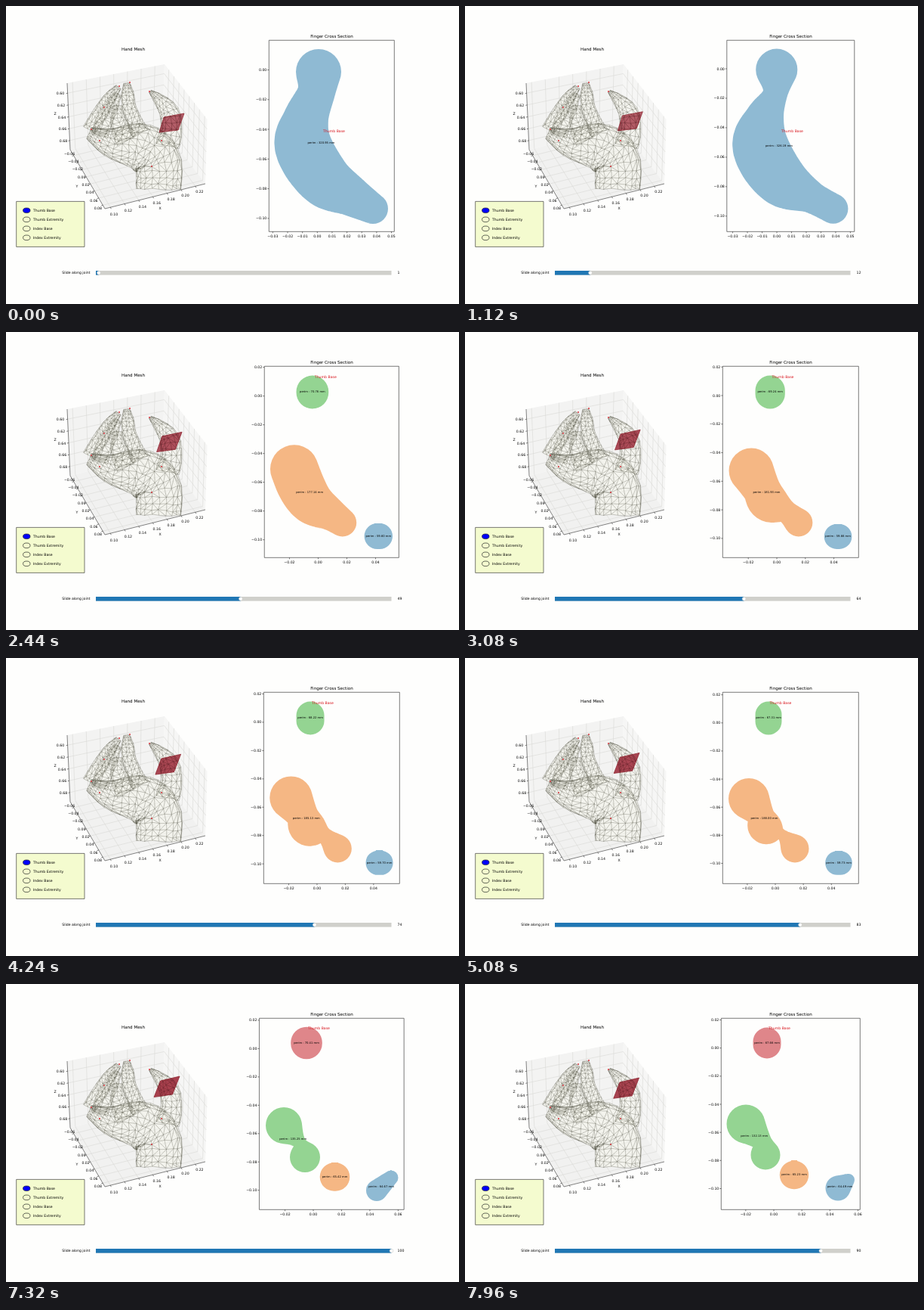
These frames come from a looping animation (600 px wide and 394 px high, 8 s). An HTML page with a canvas:

```html
<!DOCTYPE html>
<html lang="en">
<head>
<meta charset="utf-8">
<title>Hand Mesh</title>
<style>
html, body { margin: 0; width: 600px; height: 394px; overflow: hidden; background: #fefefd; }
canvas { display: block; }
</style>
</head>
<body>
<canvas id="stage" width="600" height="394"></canvas>
<script>
const c = document.getElementById('stage').getContext('2d');
const BLUE = '#8fbad3', ORANGE = '#f5b784', GREEN = '#94d492', RED = '#df868a';

const mix = (a, b, u) => a.map((n, i) => n + (b[i] - n) * u);
const fixed = n => (n < -0.001 ? '\u2212' : '') + Math.abs(n).toFixed(2);

// Rows are [position, ...numbers], mixed linearly and clamped at the ends.
function at(rows, p) {
  const i = rows.findIndex(r => r[0] >= p);
  if (i < 1) return rows[i ? rows.length - 1 : 0];
  const a = rows[i - 1], b = rows[i];
  return mix(a, b, (p - a[0]) / (b[0] - a[0]));
}

// A body is a flat list of discs x, y, r; spine() is a smooth curve through them.
function spine(body, u) {
  const last = body.length / 3 - 1, i = Math.min(Math.floor(u * last), last - 1), t = u * last - i;
  const disc = k => body.slice(3 * Math.max(0, Math.min(last, k)), 3 * Math.max(0, Math.min(last, k)) + 3);
  const [a, b, d, e] = [disc(i - 1), disc(i), disc(i + 1), disc(i + 2)];
  return b.map((n, k) => n + t / 2 * (d[k] - a[k] + t * (2 * a[k] - 5 * n + 4 * d[k] - e[k]
    + t * (3 * (n - d[k]) + e[k] - a[k]))));
}

// Time and slider value
const slide = [[40, 1], [840, 6], [1120, 12], [1800, 32], [2520, 51], [3080, 64], [3560, 74],
  [4500, 74], [5080, 83], [5240, 83], [5840, 100], [7500, 100], [7940, 90]];

// Slider value, plot width, x and y of zero, pixels per unit
const frame = [[1, 166, 412.3, 84.5, 1964], [12, 169, 413, 83, 1948], [32, 176, 414, 85.4, 1913],
  [64, 180, 413, 84, 1889], [83, 180, 411, 85.8, 1857], [90, 184, 409, 84.7, 1858], [100, 191.7, 407, 85.4, 1873]];

// Each stage runs over a range of slider values; name is the red title's place.
// Parts: colour, first and last body, first and last perimeter
const stages = [
  { range: [1, 28], name: [[420, 165], [417.5, 166]], parts: [
    [BLUE, [414,87,30, 411,114,25, 397,150,30, 394,186,38, 421,229,36, 455,250,27, 486,268,20],
      [411,80,24, 411,117,4, 396,146,19, 388,186,36, 414,230,33, 460,254,14, 490,268,19.5], [320.95, 333.8]]] },
  { range: [29, 48], name: [[412.5, 62], [409, 60]], parts: [
    [ORANGE, [410.5,80,23, 410.5,87,23], [406,79,21.5, 406,81,21.5], [80.8, 75.2]],
    [BLUE, [411,124,1, 390,155,23, 387,187,36, 413,230,32, 444,253,18, 467,256,11, 491,268,19],
      [400,152,8, 388,168,24, 383,183,32, 406,226,30, 440,250,20, 467,257,7, 492,269,19], [265, 246]]] },
  { range: [48, 83], name: [[409, 60], [403.5, 59.5]], parts: [
    [GREEN, [406,79,21.5, 406,80,21.5], [402,75,17.5, 402,84,17.5], [70.86, 67.31]],
    [ORANGE, [382,181,32, 392,206,32, 406,226,29, 430,241,22, 446,252,18.5],
      [376,186,27, 393,209,17, 398,224,22, 418,232,7, 437,252,18.5], [176.82, 188]],
    [BLUE, [491.5,270,17, 495,270,17], [493,271,15.8, 497,271,15.8], [59.6, 59.73]]] },
  { range: [90, 100], name: [[402, 58], [400, 58]], parts: [
    [RED, [400,76,18.5, 400,80,18.5], [398,77.5,20.8, 398,78.5,20.8], [67.66, 70.41]],
    [GREEN, [372,185,25.5, 393,208,13, 398,226,19.5], [368,187,24, 388,209,9, 396,229,20], [132.13, 135.25]],
    [ORANGE, [435.5,252.5,18.7, 436.5,252.5,18.7], [434.5,255,18.8, 436.5,255,18.8], [65.23, 65.42]],
    [BLUE, [494,270,16.5, 508,259,8], [491,273,14, 510,256,9.5], [64.49, 64.67]]] }];

// Drawing helpers
function text(s, x, y, size = 4.65, align = 'center', color = '#000') {
  c.font = size + 'px "DejaVu Sans", sans-serif';
  c.textAlign = align;
  c.textBaseline = 'middle';
  c.fillStyle = color;
  c.fillText(s, x, y);
}
function line(path, a, b) {
  path.moveTo(a[0], a[1]);
  path.lineTo(b[0], b[1]);
}
function stroke(path, color, width) {
  c.strokeStyle = color;
  c.lineWidth = width;
  c.stroke(path);
}
function fill(path, color) {
  c.fillStyle = color;
  c.fill(path);
}
function poly(pts) {
  const p = new Path2D();
  pts.forEach(q => p.lineTo(q[0], q[1]));
  p.closePath();
  return p;
}
function dot(x, y, rx, ry = rx) {
  const p = new Path2D();
  p.ellipse(x, y, rx, ry, 0, 0, 7);
  return p;
}

// 3D axes: top and bottom corners (left, back, right) and the front floor corner
const TL = [81, 102], TB = [210, 77], TR = [266.5, 150];
const BL = [85, 190], BB = [207, 160], BR = [264, 235], BF = [131, 268];
const walls = [[TL, TB, BB, BL], [TB, TR, BR, BB], [BL, BB, BR, BF]].map(poly);
const grid = new Path2D(), edges = new Path2D(), ticks = [];
[[TL, BL], [BL, BF], [BF, BR]].forEach(e => line(edges, ...e));

// Ticks run along a-b; each grid line bends from there over edges d-e and f-g.
function axis(n, first, start, step, [a, b, d, e, f, g], tick, label, labelStep) {
  for (let i = 0; i < n; i++) {
    const u = start + step * i, p = mix(a, b, u), q = mix(d, e, u);
    line(grid, p, q);
    line(grid, q, mix(f, g, u));
    line(edges, p, [p[0] + tick[0], p[1] + tick[1]]);
    ticks.push([fixed(first + i * 0.02), label[0] + i * labelStep[0], label[1] + i * labelStep[1]]);
  }
}
axis(7, 0.1, 0.055, 0.141, [BF, BR, BL, BB, TL, TB], [1, 2], [143, 275.5], [18.9, -4.9]);
axis(8, -0.06, 0.1, 0.12, [BL, BF, BB, BR, TB, TR], [-2, 0.6], [84, 195.5], [5.4, 10.3]);
axis(5, 0.6, 0.15, 0.178, [TL, BL, TB, BB, TR, BR], [-2, 0.5], [72, 116], [1, 15.7]);

// Hand: each body becomes a triangulated strip with seeded jitter
const mesh = new Path2D(), skin = [];
let seed = 7;
const rnd = () => (seed = seed * 16807 % 2147483647) / 2147483647 - 0.5;
function strip(body, n, m) {
  const rows = [];
  for (let i = 0; i <= n; i++) {
    const u = i / n, [x, y, r] = spine(body, u);
    const a = spine(body, Math.max(0, u - 0.02)), b = spine(body, Math.min(1, u + 0.02));
    const turn = Math.atan2(b[1] - a[1], b[0] - a[0]) + Math.PI / 2;
    rows.push(Array.from({ length: m + 1 }, (_, j) => {
      const s = -r * Math.cos(Math.PI * j / m), k = (j % m ? 0.9 : 0.2) * r / m;
      return [x + s * Math.cos(turn) + rnd() * k, y + s * Math.sin(turn) + rnd() * k];
    }));
  }
  rows.forEach((row, i) => row.forEach((p, j) => {
    if (j < m) line(mesh, p, row[j + 1]);
    if (i < n) line(mesh, p, rows[i + 1][j]);
    if (i < n && j < m) rnd() > 0 ? line(mesh, p, rows[i + 1][j + 1]) : line(mesh, row[j + 1], rows[i + 1][j]);
  }));
  skin.push(poly([...rows.map(r => r[0]), ...rows.map(r => r[m]).reverse()]));
}
strip([110,168,8, 140,181,20, 180,187,32, 201,206,31, 202,242,29.5], 18, 10);
strip([191,113,2, 203,124,8, 216,140,13, 219,162,14, 214,185,16], 12, 6);
strip([160,102,4, 161,115,8, 163,133,9, 170,152,10, 178,168,12], 13, 5);
strip([149,107,4, 138,121,8, 126,140,10, 110,164,9], 13, 5);
strip([148,116,5, 140,132,9, 130,152,11, 124,172,11], 11, 4);
strip([148,132,6, 148,148,9, 153,164,13, 160,178,14], 9, 4);
const joints = [[150,106], [164,101], [190,113], [113,163], [130,134], [124,178], [193,212], [206,178]];

function drawHand(v) {
  text('Hand Mesh', 168.5, 57.5, 5.55);
  walls.forEach((w, i) => fill(w, ['#f3f3f2', '#f6f6f5', '#f1f1f0'][i]));
  stroke(grid, '#d9d9d6', 0.6);
  stroke(edges, '#333', 0.6);
  ticks.forEach(t => text(...t));
  text('X', 204, 268);
  text('Y', 94, 238.5);
  text('Z', 65, 142.5);

  skin.forEach(s => fill(s, 'rgba(246,246,236,.45)'));
  stroke(mesh, 'rgba(70,70,55,.56)', 0.5);
  joints.forEach(j => fill(dot(...j, 1), '#d8323a'));

  // Cutting plane
  const u = (v - 1) / 99;
  const k = mix([209, 147, 236, 142, 228, 164, 203, 167], [204.5, 128, 230, 122, 220.5, 146, 196, 149.5], u);
  const plane = poly([0, 2, 4, 6].map(i => [k[i], k[i + 1]]));
  fill(plane, `rgba(150,25,42,${0.68 + 0.14 * u})`);
  c.save();
  c.clip(plane);
  stroke(mesh, 'rgba(85,40,45,.5)', 0.5);
  c.restore();
  stroke(plane, '#8a1c28', 0.7);
}

function drawPart(color, first, last, perims, u) {
  const body = mix(first, last, u), path = new Path2D();
  for (let i = 0; i <= 160; i++) path.addPath(dot(...spine(body, i / 160)));
  fill(path, color);
  // The label sits at the discs' centre of mass.
  let x = 0, y = 0, mass = 0;
  for (let i = 0; i < body.length; i += 3) {
    const w = body[i + 2] ** 2;
    x += body[i] * w;
    y += body[i + 1] * w;
    mass += w;
  }
  text(`perim : ${mix([perims[0]], [perims[1]], u)[0].toFixed(2)} mm`, x / mass, y / mass, 3.73);
}

function drawSection(v) {
  const [, width, x0, y0, scale] = at(frame, v);
  const left = 431.3 - width / 2, right = left + width;
  const { range: [from, to], name, parts } = stages.find((s, i) => v < (stages[i + 1] ? s.range[1] + 3 * (i > 1) : 101));
  const u = Math.max(0, Math.min(1, (v - from) / (to - from)));
  text('Finger Cross Section', 431.5, 41, 5.55);
  parts.forEach(p => drawPart(...p, u));
  const box = new Path2D();
  box.rect(left, 45.3, width, 253);
  for (let i = -6; i <= 8; i += width / scale < 0.09 ? 1 : 2) {
    const x = x0 + i * scale / 100;
    if (x < left || x > right) continue;
    line(box, [x, 298.3], [x, 300.3]);
    text(fixed(i / 100), x, 304.3);
  }
  for (let i = -10; i <= 2; i += 2) {
    const y = y0 - i * scale / 100;
    if (y < 45.6) continue;
    line(box, [left, y], [left - 2, y]);
    text(fixed(i / 100), left - 3, y + 0.3, 4.65, 'right');
  }
  stroke(box, '#333', 0.65);
  const [x, y] = mix(name[0], name[1], u);
  text('Thumb Base', x, y + 0.3, 4.65, 'left', '#d8141c');
}

function drawControls(v) {
  const panel = new Path2D();
  panel.rect(13.7, 258.4, 90.3, 60);
  fill(panel, '#f4fbcf');
  stroke(panel, '#333', 0.65);
  ['Thumb Base', 'Thumb Extremity', 'Index Base', 'Index Extremity'].forEach((s, i) => {
    const y = 270.3 + i * 12, button = dot(27.3, y, 4.7, 3.3);
    if (!i) fill(button, '#0000ff');
    stroke(button, '#222', 0.7);
    text(s, 36, y, 4.65, 'left');
  });

  const x = 119 + 3.915 * v, knob = dot(x, 352.8, 2.4);
  text('Slide along joint', 111.5, 352.7, 4.65, 'right');
  c.fillStyle = '#d0d0cb';
  c.fillRect(119, 350, 391.5, 5.6);
  c.fillStyle = '#2077b4';
  c.fillRect(119, 350, x - 119, 5.6);
  fill(knob, '#fff');
  stroke(knob, '#c4c4c0', 0.5);
  text(String(v), 518.5, 352.7, 4.65, 'left');
}

function draw(now) {
  const v = Math.round(at(slide, now % 8000)[1]);
  c.fillStyle = '#fefefd';
  c.fillRect(0, 0, 600, 394);
  drawHand(v);
  drawSection(v);
  drawControls(v);
  requestAnimationFrame(draw);
}
requestAnimationFrame(draw);
</script>
</body>
</html>
```
